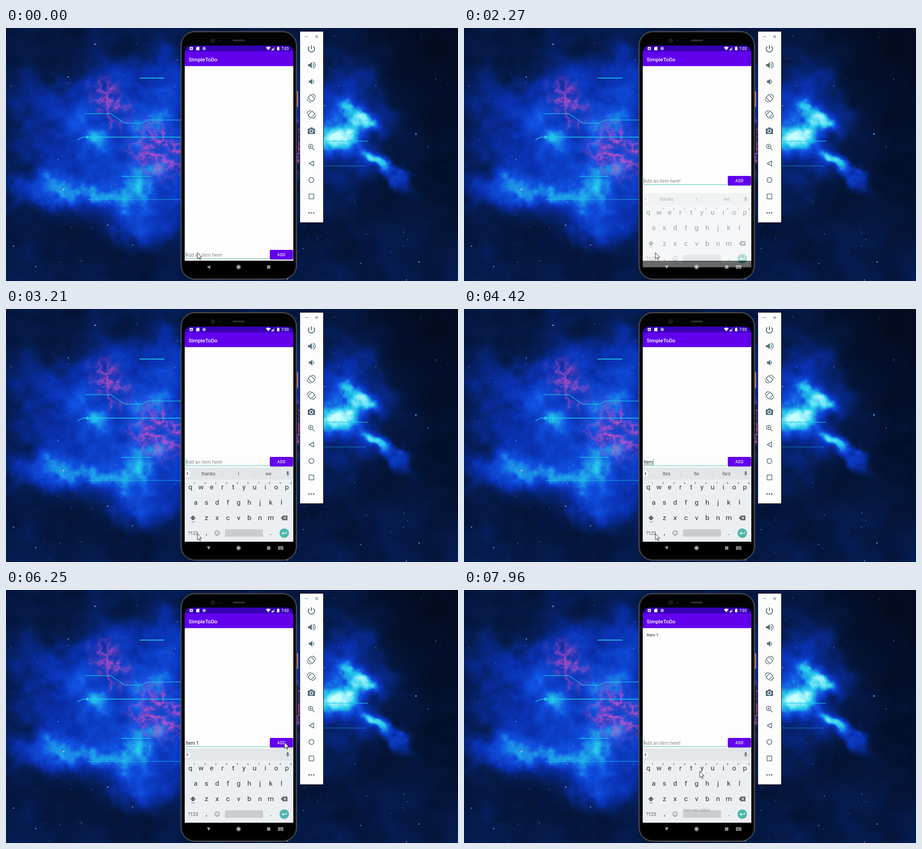
Write an HTML page with a canvas that moves like this. It is 999 by 561 pixels and loops after 8000 ms.

```html
<!DOCTYPE html>
<html lang="en">
<head>
<meta charset="utf-8">
<title>To-do app demo</title>
<style>
  html, body { margin: 0; width: 100%; height: 100%; overflow: hidden; background: #020713; }
  canvas, svg { position: absolute; left: 0; top: 0; width: 999px; height: 561px; }
  text { font-family: Roboto, "Noto Sans", sans-serif; white-space: pre; }
  .mid { text-anchor: middle; }
  .medium { font-weight: 500; fill: #fff; }
  .line { fill: none; stroke: #546e7a; stroke-width: 1.5; stroke-linejoin: round; }
  .solid { fill: #546e7a; }
</style>
</head>
<body>
<canvas id="sky" width="999" height="561"></canvas>
<svg viewBox="0 0 999 561">
  <defs>
    <clipPath id="screen"><path d="M395 546V55Q395 39 411 39H619Q635 39 635 55V546Z"/></clipPath>
  </defs>

  <!-- phone body -->
  <rect x="642" y="140" width="3.5" height="35" rx="1" fill="#c17a5c"/>
  <rect x="642" y="210" width="3.5" height="68" rx="1" fill="#111"/>
  <rect x="386.5" y="7.5" width="256" height="550" rx="31" fill="#2b2b2b" stroke="#6c6c6c"/>
  <rect x="389" y="10" width="251" height="545" rx="28" fill="#030303" stroke="#181818"/>
  <circle cx="457" cy="28" r="5.5" fill="#191919"/>
  <circle cx="472" cy="28" r="2.5" fill="#111"/>
  <rect x="501" y="25.5" width="27" height="4.5" rx="2" fill="#252525"/>
  <path d="M502 27.7H527" stroke="#444" stroke-dasharray="1 1"/>

  <g clip-path="url(#screen)">
    <rect x="395" y="39" width="240" height="14" fill="#3700b3"/>
    <rect x="395" y="52" width="240" height="33" fill="#6200ee"/>
    <rect x="395" y="84.5" width="240" height="431.5" fill="#fdfdfd"/>
    <rect x="395" y="516" width="240" height="30"/>
  </g>

  <!-- status bar -->
  <rect x="406" y="42" width="7" height="7" rx="1" fill="#fff"/>
  <path d="M407.7 47.7L409.5 43.5L411.3 47.7M408.3 46.3H410.7" fill="none" stroke="#3700b3"/>
  <path d="M422.5 41.5H427.5V49.5H420.3V43.7Z" fill="#fff"/>
  <circle cx="438" cy="45.5" r="3.7" fill="#a99be0"/>
  <path d="M574.5 43Q579.7 39.5 585 43L579.7 49.5Z" fill="#fff"/>
  <path d="M586 49.5L593.5 41.7V49.5Z" fill="#fff" fill-opacity=".45"/>
  <path d="M586 49.5L590.5 44.8V49.5Z" fill="#fff"/>
  <path d="M599 42.3H600.5V41.3H603V42.3H604.3V49.5H599Z" fill="#fff"/>
  <text class="medium" x="608.8" y="48.6" font-size="8.17">7:03</text>
  <text class="medium" x="403.8" y="73.6" font-size="11.8">SimpleToDo</text>
  <text id="item" x="403.8" y="102.8" font-size="9.33" fill="#222">Item 1</text>

  <!-- navigation bar -->
  <path id="back" d="M444 530L451.5 526V534Z" fill="#999"/>
  <circle cx="514" cy="530" r="5" fill="none" stroke="#777"/>
  <circle cx="514" cy="530" r="3.7" fill="#aaa"/>
  <rect x="576.8" y="526.3" width="7.5" height="7.5" fill="#8e8e8e"/>
  <g id="switch">
    <rect x="601" y="526" width="12" height="8" rx="1" fill="#8e8e8e"/>
    <path d="M602.5 528.3H612M602.5 530.3H612" stroke="#111" stroke-dasharray="1 1"/>
    <path d="M604.5 532.4H609.5" stroke="#111"/>
  </g>

  <!-- entry row -->
  <g id="row">
    <path d="M397 511.5H581" stroke="#44b9b0"/>
    <text id="hint" x="396.7" y="506.9" font-size="10.5" fill="#8b8b8b">Add an item here!</text>
    <text id="typed" x="396.7" y="506.9" font-size="10.5" fill="#222"></text>
    <path id="under" stroke="#333" stroke-width=".7"/>
    <rect id="caret" y="496" width="1.1" height="14.5" fill="#26bcb0"/>
    <rect id="shadow" x="583.5" y="493" width="51" height="21.5" rx="2.5"/>
    <rect x="583" y="492" width="51.5" height="21" rx="2.3" fill="#6200ee"/>
    <rect id="press" x="583" y="492" width="51.5" height="21" rx="2.3" fill="#fff"/>
    <text class="medium" x="599.8" y="505.6" font-size="8.17" letter-spacing=".73">ADD</text>
  </g>

  <!-- keyboard -->
  <g id="keys">
    <rect x="395" y="351" width="240" height="165" fill="#eceff1"/>
    <rect x="395" y="351" width="240" height="27" fill="#e3e6e8"/>
    <path d="M395 358.5H401A6.5 6.5 0 0 1 401 371.5H395Z" fill="#fff"/>
    <path d="M399.5 362L402.5 365L399.5 368" fill="none" stroke="#37474f" stroke-width="1.2"/>
    <g id="words" font-size="10.3" fill="#4b585e">
      <path d="M479 358.5V371.5M549 358.5V371.5" stroke="#ccd1d4"/>
      <text class="mid" x="447.5" y="368.7"></text>
      <text class="mid" x="514" y="368.7"></text>
      <text class="mid" x="580" y="368.7"></text>
    </g>
    <rect x="620.8" y="359.5" width="3.6" height="7" rx="1.8" fill="#5f6b70"/>
    <path d="M619 364.5Q619.3 368 622.6 368T626.2 364.5M622.6 368V370.5" fill="none" stroke="#5f6b70"/>
    <g id="caps" class="mid" font-size="15.5" fill="#263238"></g>
    <path d="M413.3 457.5L420 464.3H416.3V468H410.3V464.3H406.6Z" fill="#5b666c"/>
    <path d="M410 472.3H416.8" stroke="#5b666c"/>
    <path d="M612 458H622V468.5H612L607.5 463.2Z" fill="#5b666c"/>
    <path d="M613.7 460.7L618.7 465.7M618.7 460.7L613.7 465.7" stroke="#fff" stroke-width="1.2"/>
    <text class="mid" x="413.5" y="500.5" font-size="10.3" fill="#4b585e">?123</text>
    <g fill="none" stroke="#5b666c">
      <circle cx="466.7" cy="496.8" r="5.3"/>
      <path d="M463.7 498Q466.7 502 469.7 498M464.7 494V496M468.7 494V496"/>
    </g>
    <rect x="484" y="488.5" width="84" height="16.5" rx="1.5" fill="#c9cdcf"/>
    <circle cx="615" cy="497" r="10.5" fill="#4db6ac"/>
    <path d="M619.7 493.5V497.3H610.5M613.5 494.3L610.5 497.3L613.5 500.3" fill="none" stroke="#fff" stroke-width="1.3"/>
  </g>
  <text id="toast" x="485" y="491.3" font-size="8.17" fill="#777" fill-opacity=".65">Item was added</text>

  <!-- emulator side panel -->
  <rect x="649.5" y="7.5" width="52" height="424" fill="#fdfdfd" stroke="#111"/>
  <g class="line">
    <path d="M660.8 19H667.2M683.7 16.2L689.3 21.8M689.3 16.2L683.7 21.8" stroke-width="1.1"/>
    <path d="M670.5 41A7 7 0 1 0 679.5 41M675 38.5V46.5" stroke-width="2"/>
    <path d="M678 79A4.5 4.5 0 0 1 678 86M678.5 75.8A7 7 0 0 1 678.5 89.2"/>
    <path d="M678.5 115.5A4.5 4.5 0 0 1 678.5 122.5"/>
    <g id="turn">
      <rect x="668.5" y="151" width="13" height="9" transform="rotate(45 675 155.5)"/>
      <path d="M676 146.8Q683.5 147 684.3 154.500M674 164.200Q666.500 164 665.700 156.500"/>
    </g>
    <use href="#turn" transform="matrix(-1 0 0 1 1350 36.3)"/>
    <circle cx="673.3" cy="262.500" r="4.8"/>
    <path d="M676.8 266L681.8 271M671 262.5H675.6M673.3 260.2V264.8"/>
    <path d="M670 300.5L680 295V306Z"/>
    <circle cx="675" cy="337" r="5.5"/>
    <rect x="669.8" y="368.3" width="10.5" height="10.5"/>
  </g>
  <g class="solid">
    <path d="M667.5 80H671L676 75.5V89.5L671 85H667.5Z"/>
    <path d="M669.5 116.5H672.5L677 112.5V125.5L672.5 121.5H669.5Z"/>
    <path d="M667 223H671L672.5 220.500H677.5L679 223H683V235H667Z"/>
    <circle cx="675" cy="228.7" r="4.3" fill="#fdfdfd"/>
    <circle cx="675" cy="228.7" r="2.6"/>
    <circle cx="669.8" cy="410" r="1.7"/><circle cx="675" cy="410" r="1.7"/><circle cx="680.2" cy="410" r="1.7"/>
  </g>

  <path id="mouse" d="M0 0V14L3.2 11L5.4 16L7.4 15.1L5.2 10.3H9.6Z" fill="#fff" stroke="#111" stroke-width=".9"/>
</svg>
<script>
const $ = id => document.getElementById(id);
const set = (id, name, value) => $(id).setAttribute(name, value);
const clamp = (v, low = 0, high = 1) => Math.min(high, Math.max(low, v));
const mix = (a, b, k) => a + (b - a) * k;

// ---------- wallpaper ----------
let seed = 11;
const rand = () => (seed = (seed * 16807) % 2147483647) / 2147483647;
const grid = Float32Array.from({ length: 65536 }, rand);

function noise(x, y) {
  const xi = Math.floor(x), yi = Math.floor(y);
  const smooth = f => f * f * (3 - 2 * f);
  const u = smooth(x - xi), v = smooth(y - yi);
  const g = (a, b) => grid[((yi + b) & 255) * 256 + ((xi + a) & 255)];
  return mix(mix(g(0, 0), g(1, 0), u), mix(g(0, 1), g(1, 1), u), v);
}

function fbm(x, y) {
  let sum = 0;
  for (let i = 0, amp = .5; i < 5; i++, amp /= 2) {
    sum += amp * noise(x + i * 17, y + i * 31);
    x *= 2.1;
    y *= 2.1;
  }
  return sum;
}

// a soft-edged ellipse as a function of position
function cloud(cx, cy, w, h, angle, strength) {
  const c = Math.cos(angle), s = Math.sin(angle);
  return (x, y) => {
    const dx = x - cx, dy = y - cy;
    const r = Math.hypot((dx * c + dy * s) / w, (dy * c - dx * s) / h);
    return r > 2.5 ? 0 : strength * Math.exp(-(r ** 3));
  };
}
const total = (clouds, x, y) => clouds.reduce((sum, f) => sum + f(x, y), 0);

const blue = [
  cloud(300, 220, 165, 165, 0, .34),
  cloud(110, 250, 150, 130, 0, .2),
  cloud(310, 375, 105, 72, .3, .3),
  cloud(130, 360, 125, 32, .12, .4),
  cloud(280, 440, 60, 50, .5, .2),
  cloud(745, 210, 105, 140, 0, .26),
  cloud(730, 235, 52, 45, .4, .42),
  cloud(770, 195, 52, 18, .6, .35),
  cloud(835, 303, 70, 17, .68, .48)
];
const pink = [
  cloud(235, 160, 30, 55, -.3, .8),
  cloud(345, 270, 65, 55, -.4, 1),
  cloud(645, 265, 14, 60, 0, 1)
];

const ramp = [[2, 7, 20], [5, 27, 76], [9, 48, 175], [16, 80, 225], [36, 200, 236], [200, 255, 255]];
function tint(t) {
  const k = clamp(t, 0, .999) * 5, i = Math.floor(k);
  return ramp[i].map((c, j) => mix(c, ramp[i + 1][j], k - i));
}

function paintSky() {
  const W = 999, H = 561, ctx = $("sky").getContext("2d");
  const img = ctx.createImageData(W, H);
  for (let y = 0, o = 0; y < H; y++) for (let x = 0; x < W; x++, o += 4) {
    if (x > 395 && x < 635 && y > 30 && y < 530) continue;
    const wx = x + 50 * (fbm(x / 45 + 60, y / 45) - .48);
    const wy = y + 50 * (fbm(x / 45, y / 45 + 60) - .48);
    const night = .17 - .13 * clamp((x - 650) / 300) * (1 - y / H);
    const rgb = tint((night + total(blue, wx, wy)) * (.5 + 1.05 * fbm(x / 50, y / 50)));
    const glow = total(pink, wx, wy);
    if (glow > .02) {
      const vein = 1 - Math.abs(2 * fbm(x / 24 + 90, y / 24 + 40) - .97);
      const k = Math.min(.85, glow * vein ** 6);
      [215, 80, 200].forEach((c, j) => rgb[j] = mix(rgb[j], c, k));
    }
    img.data.set(rgb, o);
    img.data[o + 3] = 255;
  }
  ctx.putImageData(img, 0, 0);

  const dot = (x, y, r, color) => {
    ctx.fillStyle = color;
    ctx.beginPath();
    ctx.arc(x, y, r, 0, 7);
    ctx.fill();
  };
  for (let i = 0; i < 420; i++) {
    dot(rand() * W, rand() * H, .3 + rand() ** 4 * 1.2, `rgba(150,195,255,${.2 + rand() * .6})`);
  }
  dot(197, 36, 1.6, "#e9a08f");
  dot(127, 358, 1.8, "#ffb3b0");
  dot(906, 235, 2, "#2f8fff");

  // glowing circuit traces
  const trace = (alpha, ...pts) => {
    ctx.strokeStyle = `rgba(30,205,235,${alpha})`;
    ctx.lineWidth = 1.8;
    ctx.beginPath();
    for (let i = 0; i < pts.length; i += 2) ctx.lineTo(pts[i], pts[i + 1]);
    ctx.stroke();
  };
  trace(.9, 295, 111, 350, 111);
  trace(.6, 175, 190, 232, 190, 262, 211, 300, 211, 312, 204, 386, 204);
  trace(.8, 158, 248, 170, 242, 386, 242);
  trace(.7, 255, 329, 320, 329);
  trace(.4, 180, 380, 386, 380);
  trace(.6, 703, 251, 800, 251);
  trace(.3, 703, 306, 795, 306);
  dot(180, 242, 3.2, "#21c9e4");
}

// ---------- key caps ----------
function addRow(chars, x, y, size = 15.5) {
  [...chars].forEach((char, i) => {
    const el = document.createElementNS("http://www.w3.org/2000/svg", "text");
    el.textContent = char;
    el.setAttribute("x", x + i * 23.72);
    el.setAttribute("y", y);
    el.setAttribute("font-size", size);
    $("caps").append(el);
  });
}
addRow("qwertyuiop", 407.3, 399.6);
addRow("1234567890", 416.3, 388, 5.8);
addRow("asdfghjkl", 419.2, 433.8);
addRow("zxcvbnm", 443, 468.2);
addRow(",", 443, 500.5);
addRow(".", 585.5, 500.5);

// ---------- timeline ----------
const LOOP = 8000;
const FOCUS = 1600, LIFT = 2120, KEYS = 2250, MOVE = 5490, TAP = 7330, CLEAR = 7810, ADDED = 7960;
const strokes = [3490, 3900, 4140, 4420, 4850, 5350];
const wakes = [-100, FOCUS, 2030, ...strokes, CLEAR];
const labels = document.querySelectorAll("#words text");

// progress 0..1 in n visible jumps
const jumps = (t, start, gap, n) => clamp(Math.floor((t - start) / gap) + 1, 0, n) / n;
const typedAt = t => t < CLEAR ? "Item 1".slice(0, strokes.filter(s => s <= t).length) : "";

function suggest(typed, t) {
  if (t > strokes[5]) return [];
  if (!typed) return ["thanks", "I", "we"];
  return typed.endsWith(" ") ? ["is", "I", "and"] : [typed + "s", typed, typed + "'s"];
}

function mouseAt(t) {
  if (t >= ADDED) return [521, 402];
  const k = jumps(t, MOVE, 123, 6);
  return [mix(423, 615.5, k), mix(498, 337.5, k)];
}

function draw(t) {
  const typed = typedAt(t);
  const nav = jumps(t, FOCUS, 120, 3);
  const hidden = 1 - jumps(t, KEYS, 138, 4);
  const press = t < TAP || t >= ADDED ? 0 : .2 * Math.sin(Math.PI * (t - TAP + 80) / 710);
  const words = suggest(typedAt(t - 130), t);
  const wake = wakes.findLast(w => w <= t);

  set("row", "transform", `translate(0 ${t < LIFT ? 0 : -164})`);
  set("hint", "opacity", typed ? 0 : 1);
  $("typed").textContent = typed;
  const end = 396.9 + (typed ? $("typed").getComputedTextLength() : 0);
  set("caret", "x", end);
  set("caret", "opacity", (t - wake) % 1000 < 500 ? 1 : 0);
  set("under", "d", typed && !typed.includes(" ") ? `M397 509H${end}` : "");
  set("press", "opacity", press);
  set("shadow", "opacity", .25 + press);

  set("back", "transform", `rotate(${-90 * nav} 448 530)`);
  set("switch", "opacity", nav);
  set("keys", "transform", `translate(0 ${19.4 * hidden})`);
  set("keys", "opacity", 1 - hidden ** 2);
  set("words", "opacity", words.length ? 1 : 0);
  labels.forEach((el, i) => el.textContent = words[i] || "");

  set("item", "opacity", t < ADDED ? 0 : 1);
  set("toast", "opacity", t < ADDED ? 0 : 1);
  set("mouse", "transform", `translate(${mouseAt(t)})`);
}

paintSky();
function tick() {
  draw(performance.now() % LOOP);
  requestAnimationFrame(tick);
}
tick();
</script>
</body>
</html>
```
